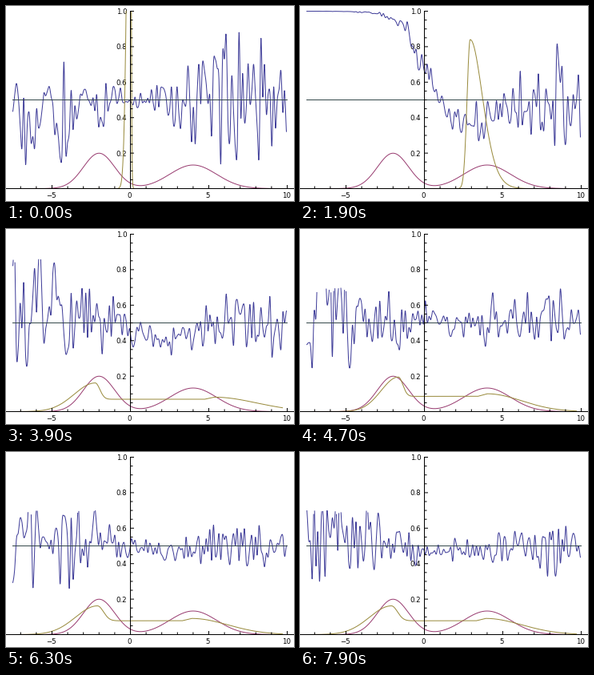
A matplotlib script that plays this animation: 360x244 px, repeating every 8000 ms.

```python
import numpy as np
import matplotlib.pyplot as plt
from matplotlib.animation import FuncAnimation
from matplotlib.patches import Rectangle

W, H, DPI = 360, 244, 100
FRAMES, STEP = 80, 100
PX = 72 / DPI
SX, SY = 19.6, 222            # pixels per data unit
X0, Y0 = 155.5, 228.5         # origin in pixels
LEFT, RIGHT = -X0 / SX, (W - X0) / SX

BLUE, PURPLE, OLIVE, GREEN = "#3f3d99", "#993d71", "#998b3d", "#35484a"

plt.rcParams["path.snap"] = False    # coordinates already sit on pixel centres

KNOTS = np.linspace(-7.5, 9.95, 151)
FINE = np.linspace(-7.5, 9.95, 1801)
GEN = np.linspace(-7.3, 9.7, 1701)

rng = np.random.default_rng(12)
white = rng.standard_normal((FRAMES + 1, KNOTS.size))
NOISE = (white[1:] + .7 * white[:-1]) / np.hypot(1, .7)

# Generator poses: time, peak, edge | height, rise, fall, level, tail
POSES = np.array([
    (0, 0, .1, 2.6, .2, .045, .02, .05),
    (10, 2.88, 3.5, 3, .08, .13, .3, .55),
    (19, 2.92, 4, .84, .2, .75, .06, .8),
    (32, -2.75, 6.5, .137, 1.6, .3, .058, 3.2),
    (47, -1.66, 4, .195, 1.1, .28, .086, 2.2),
    (63, -2.1, 3.9, .162, 1.4, .38, .078, 2.3)])


def gauss(u):
    return np.exp(-.5 * u * u)


def smooth(values):
    """Catmull-Rom curve through the knots, sampled on FINE."""
    p = np.pad(values, 2, mode="edge")
    s = (FINE - KNOTS[0]) / (KNOTS[1] - KNOTS[0])
    k = np.minimum(s.astype(int), KNOTS.size - 2)
    t = s - k
    a, b, c, d = p[k + 1], p[k + 2], p[k + 3], p[k + 4]
    return b + .5 * t * (c - a + t * (2 * a - 5 * b + 4 * c - d
                                      + t * (3 * (b - c) + d - a)))


def discriminator(i):
    x = KNOTS
    # a confident left side that comes and goes, with a dip right of centre
    gain = np.interp(i, [0, 10, 19, 32, 47], [-.08, 1, 1.1, .1, .02])
    edge = np.interp(i, [10, 19], [-.3, .8])
    dip = np.interp(i, [0, 10, 32, 47, 79], [0, .8, .75, 0, .15])
    mean = gain * np.logaddexp(0, edge - x) - dip * np.exp(-((x - 2) / 3) ** 2)
    # noise grows away from the middle
    left = np.interp(i, [0, 10, 19, 32, 47, 63], [.09, .05, .08, .13, .1, .07])
    right = np.interp(i, [0, 10, 19, 32, 79], [.14, .16, .09, .05, .025])
    spread = .1 + left * np.maximum(1 - x, 0) + right * np.clip(x - 1, 0, 5)
    y = np.clip(smooth(1 / (1 + np.exp(-mean - spread * NOISE[i]))), 0, 1)
    top = np.interp(i, [32, 47], [1, .7])
    return np.where(y > top, np.nan, y)


def generator(i):
    time = POSES[:, 0]
    peak, edge = (np.interp(i, time, col) for col in POSES.T[1:3])
    height, rise, fall, level, tail = (
        np.exp(np.interp(i, time, np.log(col))) for col in POSES.T[3:])
    x = GEN
    step = np.clip((x - edge) / .6 + 1, 0, 1)
    shelf = level * (1 + .17 * step) * gauss(np.maximum(x - edge, 0) / tail)
    return np.where(x < peak, height * gauss((x - peak) / rise),
                    shelf + (height - level) * gauss((x - peak) / fall))


def bell(x, m, s):
    return gauss((x - m) / s) / (s * np.sqrt(2 * np.pi))


fig = plt.figure(figsize=(W / DPI, H / DPI), dpi=DPI, facecolor="white")
ax = fig.add_axes([0, 0, 1, 1])
ax.axis("off")
ax.set_xlim(LEFT, RIGHT)
ax.set_ylim((Y0 - H) / SY, Y0 / SY)
window = Rectangle((-7.55, -.004), 17.6, 1.008, transform=ax.transData)


def curve(x, y, color, z):
    line, = ax.plot(x, y, color=color, lw=PX, zorder=z)
    line.set_clip_path(window)
    return line


def label(x, y, s, ha):
    ax.text(x, y, s, ha=ha, va="baseline", family="DejaVu Sans",
            size=8.6 * PX, color="black", zorder=1)


def draw_axes():
    style = dict(color="black", lw=PX, zorder=6)
    ax.plot([LEFT, RIGHT], [0, 0], **style)
    ax.plot([0, 0], [0, 1], **style)
    for n in range(-7, 11):
        major = n % 5 == 0
        ax.plot([n, n], [0, (4 if major else 2.5) / SY], **style)
        if major:
            label(n - 1 / SX, -12 / SY, str(n).replace("-", "\u2212"), "center")
    for n in range(1, 21):
        y, major = n / 20, n % 4 == 0
        ax.plot([0, (4 if major else 2.5) / SX], [y, y], **style)
        if major:
            label(-4 / SX, y - 3.5 / SY, f"{y:.1f}", "right")


draw_axes()
xs = np.linspace(-7.5, 10, 500)
blue = curve([], [], BLUE, 2)
curve(xs, .5 * bell(xs, -2, 1) + .5 * bell(xs, 4, 1.5), PURPLE, 3)
olive = curve([], [], OLIVE, 4)
curve([-7.5, 10], [.5, .5], GREEN, 5)


def update(i):
    blue.set_data(FINE, discriminator(i))
    olive.set_data(GEN, generator(i))
    return blue, olive


anim = FuncAnimation(fig, update, frames=FRAMES, interval=STEP,
                     repeat=True, repeat_delay=0)
plt.show()
```
